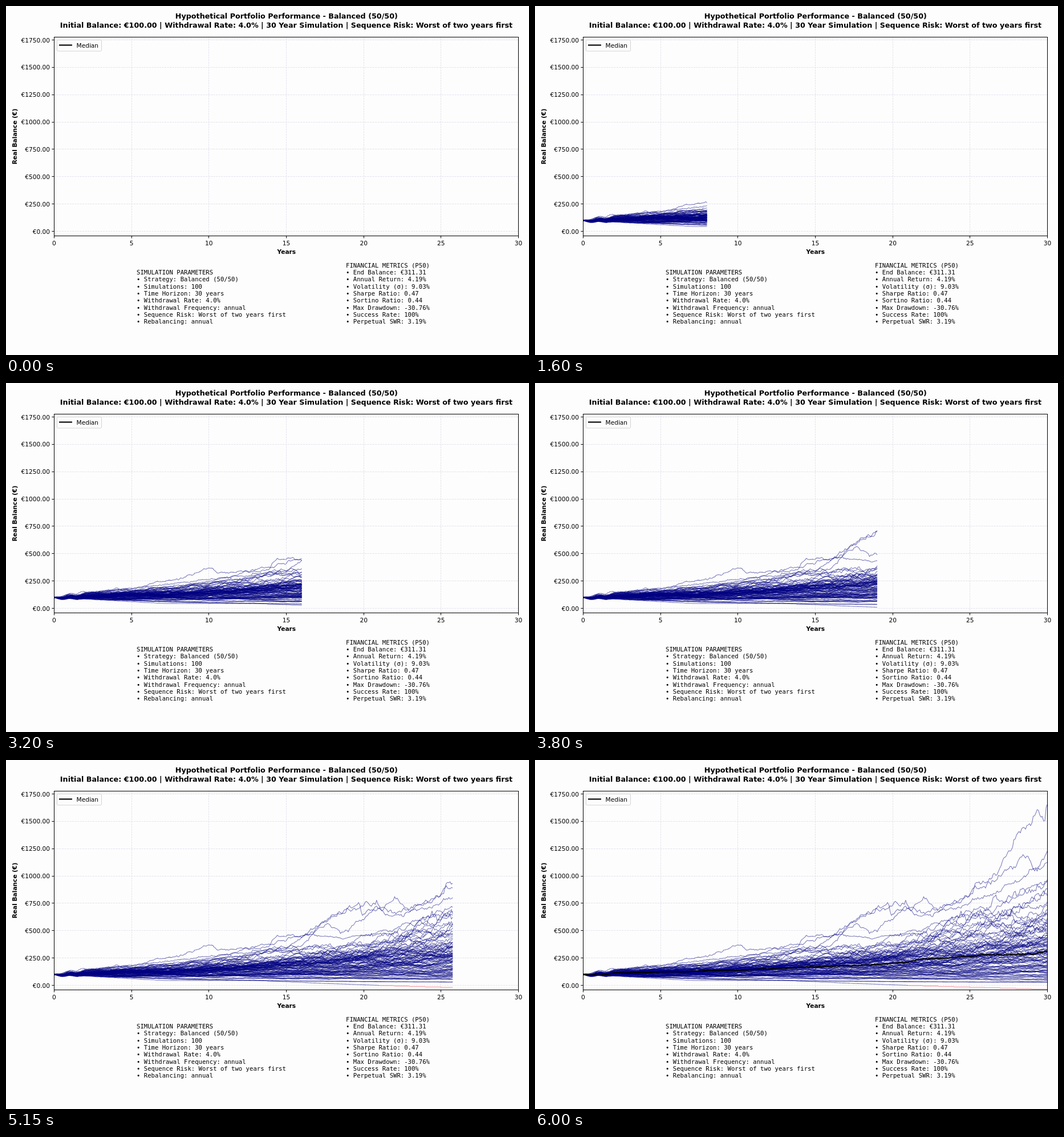
Write an HTML page with a canvas that moves like this. It is 917 by 611 pixels and loops after 6.05 s.

```html
<!DOCTYPE html>
<html lang="en">
<head>
<meta charset="utf-8">
<title>Portfolio simulation</title>
<style>
html, body { margin: 0; width: 100%; height: 100%; overflow: hidden; background: #fdfdfd; }
canvas { display: block; }
</style>
</head>
<body>
<canvas id="stage" width="917" height="611"></canvas>
<script>
const ctx = document.getElementById('stage').getContext('2d');
const LEFT = 84.5, RIGHT = 898.5, TOP = 54.5, BOTTOM = 402.5;
const YEARS = 30, MONTHS = 360, STEP = 50, STEPS = 121;
const SANS = '"DejaVu Sans", sans-serif', MONO = '"DejaVu Sans Mono", monospace';
const PT = 917 / 12 / 72;
const NAVY = 'rgba(0,0,128,0.52)', RED = 'rgba(220,20,40,0.45)', GRID = '#dedeee';
const px = year => LEFT + year * (RIGHT - LEFT) / YEARS;
const py = value => 394.5 - value * 0.1914;
const snap = v => Math.floor(v) + 0.5;

let seed = 20;
function rand() {
  seed = (seed * 1664525 + 1013904223) % 4294967296;
  return (seed + 0.5) / 4294967296;
}
const gauss = () => Math.sqrt(-2 * Math.log(rand())) * Math.cos(2 * Math.PI * rand());

// Shared ups and downs of the first two years, as a log factor
const opening = t => t < 2
  ? 0.02 * t - 0.1 * Math.sin(Math.PI * t) ** 2
  : 0.04 * Math.exp((2 - t) / 8);

// Linear interpolation in a flat list: year, value, year, value ...
const through = points => year => {
  let i = 0;
  while (i < points.length - 4 && points[i + 2] < year) i += 2;
  const [x0, y0, x1, y1] = points.slice(i, i + 4);
  return y0 + (y1 - y0) * (year - x0) / (x1 - x0);
};

// A path along a curve with a small correlated jitter
function guided(curve, jitter) {
  const path = [];
  let n = 0;
  for (let m = 0; m <= MONTHS; m++) {
    const t = m / 12;
    path.push(curve(t) * Math.exp(opening(t)) * (1 + n));
    n = 0.65 * n + jitter * gauss();
  }
  return path;
}

// Logarithmic random walk tied to its final value
function bridged(end) {
  const walk = [0];
  for (let m = 1; m <= MONTHS; m++) walk.push(walk[m - 1] + 0.026 * gauss());
  return walk.map((w, m) => {
    const u = m / MONTHS;
    const trend = Math.log(end / 100) * u ** 1.15;
    return 100 * Math.exp(trend + w - walk[MONTHS] * u + opening(m / 12));
  });
}

const early = through([0, 100, 5.5, 182, 6.5, 230, 8, 258, 10, 363, 10.7, 323, 13.8, 345,
  14.3, 438, 16, 462, 19, 430, 22, 510, 25.7, 735, 26.5, 690, 30, 980]);
const best = through([0, 100, 8, 180, 16, 450, 18, 630, 20.8, 760, 21.2, 680, 22, 790, 23, 710,
  25, 810, 25.3, 915, 26.6, 975, 28, 1355, 28.6, 1495, 28.9, 1440, 29.3, 1575, 29.6, 1575,
  29.8, 1450, 30, 1622]);
const second = through([0, 100, 15, 340, 18, 620, 19.7, 745, 19.9, 640, 20.7, 690, 23, 680,
  25.7, 885, 27, 1010, 28.4, 1185, 29.1, 1070, 30, 1175]);
const third = through([0, 100, 8, 150, 16, 360, 17.6, 575, 18.5, 470, 21, 700, 21.7, 620,
  25.7, 790, 30, 1120]);
const ruin = through([0, 100, 7, 44, 13, 44, 18, 15, 21, 0]);
const middle = through([0, 100, 10, 138, 20, 197, 22, 236, 26, 278, 29, 287, 30, 311]);
const decay = (rest, span) => t => rest + (100 - rest) * Math.exp(-t / span);

const paths = [early, best, second, third].map(curve => guided(curve, 0.015));
paths.push(guided(decay(25, 9), 0.01), guided(decay(26, 10), 0.01));
const BULK = 93;
for (let i = 0; i < BULK; i++) {
  const q = 0.025 + 0.94 * i / (BULK - 1);
  const z = Math.log(q / (1 - q)) / 1.7;
  paths.push(bridged(300 * Math.exp(z * (z > 0 ? 0.6 : 0.95))));
}
const RUIN_MONTH = 252;
const ruined = guided(ruin, 0.012);
const debt = ruined.map((_, m) => -4 * Math.max(0, Math.floor(m / 12) - 21) - 2);
const median = guided(middle, 0.01);

function plot(path, color, width, from, to) {
  ctx.beginPath();
  for (let m = from; m <= to; m++) ctx.lineTo(px(m / 12), py(path[m]));
  ctx.strokeStyle = color;
  ctx.lineWidth = width;
  ctx.stroke();
}

function line(x0, y0, x1, y1, color, width) {
  ctx.beginPath();
  ctx.moveTo(x0, y0);
  ctx.lineTo(x1, y1);
  ctx.strokeStyle = color;
  ctx.lineWidth = width;
  ctx.stroke();
}

function text(str, x, y, align = 'left', size = 10, style = '', family = SANS) {
  ctx.font = `${style} ${size * PT}px ${family}`;
  ctx.textAlign = align;
  ctx.fillStyle = '#000';
  ctx.fillText(str, x, y);
}

function grid() {
  ctx.setLineDash([3.1, 1.4]);
  for (let t = 0; t <= YEARS; t += 5) line(snap(px(t)), BOTTOM, snap(px(t)), TOP, GRID, 0.85);
  for (let v = 0; v <= 1750; v += 250) line(LEFT, snap(py(v)), RIGHT, snap(py(v)), GRID, 0.85);
  ctx.setLineDash([]);
}

function axes() {
  ctx.strokeStyle = '#000';
  ctx.lineWidth = 1;
  ctx.strokeRect(LEFT, TOP, RIGHT - LEFT, BOTTOM - TOP);
  for (let t = 0; t <= YEARS; t += 5) {
    line(snap(px(t)), BOTTOM, snap(px(t)), BOTTOM + 4, '#000', 1);
    text(t, px(t), 418.5, 'center');
  }
  for (let v = 0; v <= 1750; v += 250) {
    line(LEFT - 4, snap(py(v)), LEFT, snap(py(v)), '#000', 1);
    text('€' + v.toFixed(2), 77, py(v) + 4, 'right');
  }
  text('Years', 491.8, 434, 'center', 10, 'bold');
  ctx.save();
  ctx.translate(19, 228.5);
  ctx.rotate(-Math.PI / 2);
  text('Real Balance (€)', 0, 0, 'center', 10, 'bold');
  ctx.restore();
}

function legend() {
  ctx.beginPath();
  ctx.roundRect(89.5, 59.5, 78, 19.5, 2);
  ctx.fillStyle = 'rgba(253,253,253,0.8)';
  ctx.fill();
  ctx.strokeStyle = '#d4d4d8';
  ctx.lineWidth = 1;
  ctx.stroke();
  line(93, 68.5, 116, 68.5, '#000', 2.12);
  text('Median', 123.5, 72.5);
}

const settings = `SIMULATION PARAMETERS
• Strategy: Balanced (50/50)
• Simulations: 100
• Time Horizon: 30 years
• Withdrawal Rate: 4.0%
• Withdrawal Frequency: annual
• Sequence Risk: Worst of two years first
• Rebalancing: annual`;
const metrics = `FINANCIAL METRICS (P50)
• End Balance: €311.31
• Annual Return: 4.19%
• Volatility (σ): 9.03%
• Sharpe Ratio: 0.47
• Sortino Ratio: 0.44
• Max Drawdown: -30.76%
• Success Rate: 100%
• Perpetual SWR: 3.19%`;

function block(lines, x, y) {
  lines.split('\n').forEach((s, i) => text(s, x, y + i * 12.34, 'left', 10, '', MONO));
}

function draw(step) {
  const last = step * 3;
  ctx.fillStyle = '#fdfdfd';
  ctx.fillRect(0, 0, 917, 611);
  grid();
  ctx.save();
  ctx.beginPath();
  ctx.rect(LEFT, TOP, RIGHT - LEFT, BOTTOM - TOP);
  ctx.clip();
  ctx.lineJoin = 'round';
  for (const p of paths) plot(p, NAVY, 1.06, 0, last);
  plot(ruined, NAVY, 1.06, 0, Math.min(last, RUIN_MONTH));
  plot(debt, RED, 1.06, RUIN_MONTH, last);
  if (step === STEPS - 1) plot(median, '#000', 2.12, 0, last);
  ctx.restore();
  axes();
  legend();
  text('Hypothetical Portfolio Performance - Balanced (50/50)', 491.8, 22, 'center', 12, 'bold');
  text('Initial Balance: €100.00 | Withdrawal Rate: 4.0% | 30 Year Simulation | Sequence Risk: Worst of two years first',
    491.5, 38, 'center', 12, 'bold');
  block(settings, 229, 470);
  block(metrics, 596, 457.7);
}

let start, shown = -1;
function tick(now) {
  start ??= now;
  const step = Math.floor((now - start) / STEP) % STEPS;
  if (step !== shown) draw(shown = step);
  requestAnimationFrame(tick);
}
requestAnimationFrame(tick);
</script>
</body>
</html>
```
